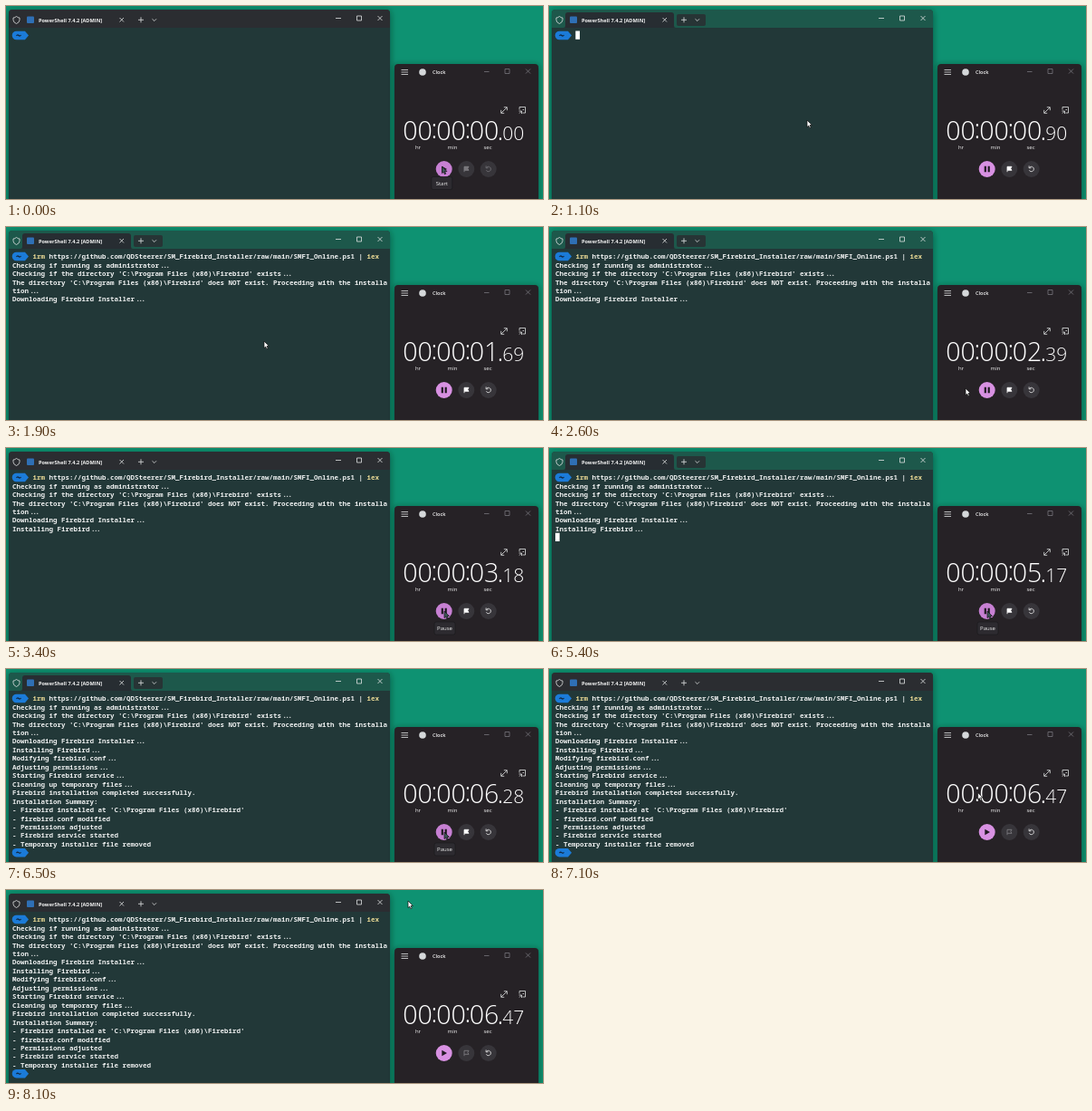
Animation of 593 by 213 pixels, one loop 8.2 s. Source, as an HTML page:

```html
<!DOCTYPE html>
<html lang="en">
<head>
<meta charset="utf-8">
<title>Terminal install timed with a stopwatch</title>
<style>
  html, body { margin: 0; width: 100%; height: 100%; overflow: hidden; background: #0e9272; }
  svg { display: block; }
  text { fill: #f4f4f4; font-family: "Open Sans", "Noto Sans", sans-serif; font-size: 6px; white-space: pre; }
  .mid { text-anchor: middle; }
  .title { font-size: 5.6px; font-weight: 700; }
  .mono text { font: 600 7.5px "Noto Sans Mono", "DejaVu Sans Mono", monospace; fill: #eceeee; font-variant-ligatures: none; }
  .cmd { fill: #e8d894; }
  .dots { letter-spacing: -1.5px; }
  .digits text { font-weight: 300; font-size: 28.5px; fill: #fff; }
  .line { fill: none; stroke: #e0e3e3; stroke-width: .8; }
  .dim { stroke: #77757b; }
</style>
</head>
<body>
<svg width="593" height="213" viewBox="0 0 593 213">
  <defs>
    <filter id="shadow" x="-10%" y="-10%" width="120%" height="120%">
      <feDropShadow dx="0" dy="1.5" stdDeviation="3.5" flood-color="#00251b" flood-opacity=".6"/>
    </filter>
    <g id="pill">
      <path d="M11.5 -4.8H21L25 0L21 4.8H11.5A4.8 4.8 0 0 1 11.5 -4.8Z" fill="#1b7bd8"/>
      <path d="M11.5 .3Q12.8 -1.2 14 0T16.5 -.3" fill="none" stroke="#10243a" stroke-width="1.2"/>
    </g>
  </defs>
  <rect width="593" height="213" fill="#0e9272"/>

  <!-- terminal -->
  <rect x="3" y="4" width="421" height="220" rx="4" fill="#243738" filter="url(#shadow)"/>
  <path id="bar" d="M3 24V8Q3 4 7 4H420Q424 4 424 8V24Z"/>
  <g id="tabs">
    <path d="M16 24Q18 24 18 22V10Q18 7 21 7H135Q138 7 138 10V22Q138 24 140 24Z" fill="#272d32"/>
    <rect x="141" y="9" width="32" height="13" rx="2" fill="#273435"/>
  </g>
  <path class="line" d="M11.500 11.500Q13.300 13 15 13V15.500Q15 18 11.500 19.500Q8 18 8 15.500V13Q9.800 13 11.500 11.500Z"/>
  <rect x="23" y="11.500" width="8" height="7.500" rx="1" fill="#2f6fb5"/>
  <text class="title" x="36" y="17.700">PowerShell 7.4.2 [ADMIN]</text>
  <path class="line" d="M125.500 13L130 17.500M130 13L125.500 17.500M146 15.300H152M149 12.300V18.300M161.500 14.300L163.800 16.500L166 14.300M364 13.500H370M387.500 11H392.500V16H387.500ZM410.500 11L415.500 16M415.500 11L410.500 16"/>
  <g class="mono">
    <use href="#pill" y="32.500"/>
    <text id="command" x="29.500" y="35.200"><tspan class="cmd">irm</tspan> https://github.com/QDSteerer/SM_Firebird_Installer/raw/main/SMFI_Online.ps1 | <tspan class="cmd">iex</tspan></text>
    <g id="output"></g>
    <use id="prompt" href="#pill" y="202.700"/>
    <rect id="caret" width="4.700" height="9.300" fill="#fff"/>
  </g>

  <!-- stopwatch -->
  <rect x="429" y="64" width="159" height="160" rx="4" fill="#252328" filter="url(#shadow)"/>
  <path class="line" d="M436.500 70.500H444M436.500 73H444M436.500 75.500H444"/>
  <circle cx="460" cy="73" r="3.800" fill="#d5d8da"/>
  <text class="title" x="471" y="75.200" style="font-weight:600">Clock</text>
  <path class="line dim" d="M528 72.500H533.500M551 69.500H556V74.500H551ZM574 69.500L579 74.500M579 69.500L574 74.500"/>
  <path class="line" d="M547 118L553 112M549.800 111.700H553.300V115.200M546.700 114.800V118.300H550.200"/>
  <path class="line" d="M567 114.500V111.500H573.500V118H570.500M566.500 116H569.500V119M569.500 116L567 118.500M570.500 114.500H572"/>
  <g class="digits mid" transform="translate(0 -.7)">
    <text x="454.500" y="148.500">00</text><text x="472.800" y="146.500">:</text>
    <text x="491.500" y="148.500">00</text><text x="509.800" y="146.500">:</text>
    <text id="sec" x="528" y="148.500"></text><text x="546" y="148.500">.</text>
    <text id="cent" x="560.300" y="148.500" style="font-size:21px"></text>
  </g>
  <g class="mid">
    <text x="455" y="158.300">hr</text><text x="493" y="158.300">min</text><text x="532" y="158.300">sec</text>
  </g>
  <circle id="main" cx="483.700" cy="180" r="9"/>
  <path id="play" d="M481.300 176.700L487 180L481.300 183.300Z" fill="#201a22"/>
  <path id="pause" d="M480.700 176.700H482.900V183.300H480.700ZM484.600 176.700H486.800V183.300H484.600Z" fill="#201a22"/>
  <circle cx="508.300" cy="180" r="9" fill="#37353a"/>
  <path id="flag" d="M506 183.200V177.300H511L509.800 179.300L511 181.300H506.200" stroke-width=".8"/>
  <circle cx="532.700" cy="180" r="9" fill="#37353a"/>
  <path id="reset" class="line" d="M530.400 178.500A2.700 2.700 0 1 1 530.300 181.300M530.100 176.400V178.800H532.500"/>
  <g id="tip">
    <rect x="-11.500" y="-7" width="23" height="14" rx="2" fill="#2d2b30" stroke="#1b1a1d" stroke-width=".7"/>
    <text id="tipText" class="mid" y="2.200"></text>
  </g>
  <path id="mouse" d="M0 0V7.600L1.700 6.100L2.900 8.700L4.200 8.100L3 5.500H5.400Z" stroke="#111" stroke-width=".7"/>
</svg>
<script>
const LOOP = 8200, STEP = 100;
const START = 200, STOP = 6700, PASTE = 1400, DONE = 6300;
const $ = id => document.getElementById(id);
const show = (id, on) => $(id).style.display = on ? "" : "none";
const set = (id, name, value) => $(id).setAttribute(name, value);
const place = (id, x, y) => set(id, "transform", `translate(${x} ${y})`);
const within = (t, a, b) => t >= a && t < b;

// [time shown, text]
const lines = [
  [1600, "Checking if running as administrator..."],
  [1700, "Checking if the directory 'C:\\Program Files (x86)\\Firebird' exists..."],
  [1800, "The directory 'C:\\Program Files (x86)\\Firebird' does NOT exist. Proceeding with the installa"],
  [1800, "tion..."],
  [1900, "Downloading Firebird Installer..."],
  [3300, "Installing Firebird..."],
  [5600, "Modifying firebird.conf..."],
  [5700, "Adjusting permissions..."],
  [5900, "Starting Firebird service..."],
  [6200, "Cleaning up temporary files..."],
  [DONE, "Firebird installation completed successfully."],
  [DONE, "Installation Summary:"],
  [DONE, "- Firebird installed at 'C:\\Program Files (x86)\\Firebird'"],
  [DONE, "- firebird.conf modified"],
  [DONE, "- Permissions adjusted"],
  [DONE, "- Firebird service started"],
  [DONE, "- Temporary installer file removed"]
];
const rows = lines.map(([, str], i) => {
  const row = document.createElementNS("http://www.w3.org/2000/svg", "text");
  row.setAttribute("x", 7);
  row.setAttribute("y", 35.2 + 9.45 * (i + 1));
  // an ellipsis is set tighter, as a ligature
  row.innerHTML = str.replace("...", '<tspan class="dots" dx="1.5">...</tspan>');
  return $("output").appendChild(row);
});

// [time, values...]
const watch = [[START, 0], [1100, .9], [2600, 2.39], [4500, 4.26], [5400, 5.17], [6500, 6.28], [STOP, 6.47]];
const path = [[0, 481.5, 177], [300, 481.5, 177], [900, 285, 126], [2100, 285, 126], [2600, 460, 178],
  [2900, 484, 180], [6800, 484, 180], [7700, 444, 12]];
const smooth = k => k * k * (3 - 2 * k);

function along(keys, t, ease = k => k) {
  const i = keys.findIndex(k => k[0] > t);
  if (i === 0) return keys[0].slice(1);
  if (i < 0) return keys[keys.length - 1].slice(1);
  const a = keys[i - 1], b = keys[i], k = ease((t - a[0]) / (b[0] - a[0]));
  return a.slice(1).map((v, j) => v + (b[j + 1] - v) * k);
}

function draw(t) {
  const running = within(t, START, STOP);
  const focused = within(t, 900, 3400) || within(t, 4800, STOP);
  const [x, y] = along(path, t, smooth);
  const hover = Math.hypot(x - 483.7, y - 180) < 9;

  set("bar", "fill", focused ? "#1d584b" : "#2b2d31");
  show("tabs", focused);
  show("command", t >= PASTE);
  rows.forEach((row, i) => row.style.display = t >= lines[i][0] ? "" : "none");
  show("prompt", t >= DONE);
  show("caret", within(t, 900, PASTE) || within(t, 5000, 5600));
  if (t < PASTE) place("caret", 29.3, 27.5);
  else place("caret", 7, 93.7);

  const cents = Math.round(along(watch, t)[0] * 100);
  const pad = n => String(n).padStart(2, "0");
  $("sec").textContent = pad(Math.floor(cents / 100));
  $("cent").textContent = pad(cents % 100);

  set("main", "fill", hover ? "#c780d3" : "#d891e2");
  show("play", !running);
  show("pause", running);
  set("flag", "fill", running ? "#fff" : t < START ? "#77757a" : "none");
  set("flag", "stroke", running ? "#fff" : "#858388");
  $("reset").style.stroke = t < START ? "#77757a" : "#f0f0f0";

  show("tip", hover);
  $("tipText").textContent = running ? "Pause" : "Start";
  if (t < 900) place("tip", 481.3, 195.5);
  else place("tip", 484.5, 199);
  place("mouse", x, y);
  set("mouse", "fill", hover ? "#3f5759" : "#fff");
}

const begin = performance.now();
function tick() {
  const t = Math.max(0, performance.now() - begin) % LOOP;
  draw(Math.floor(t / STEP) * STEP);
  requestAnimationFrame(tick);
}
tick();
</script>
</body>
</html>
```
